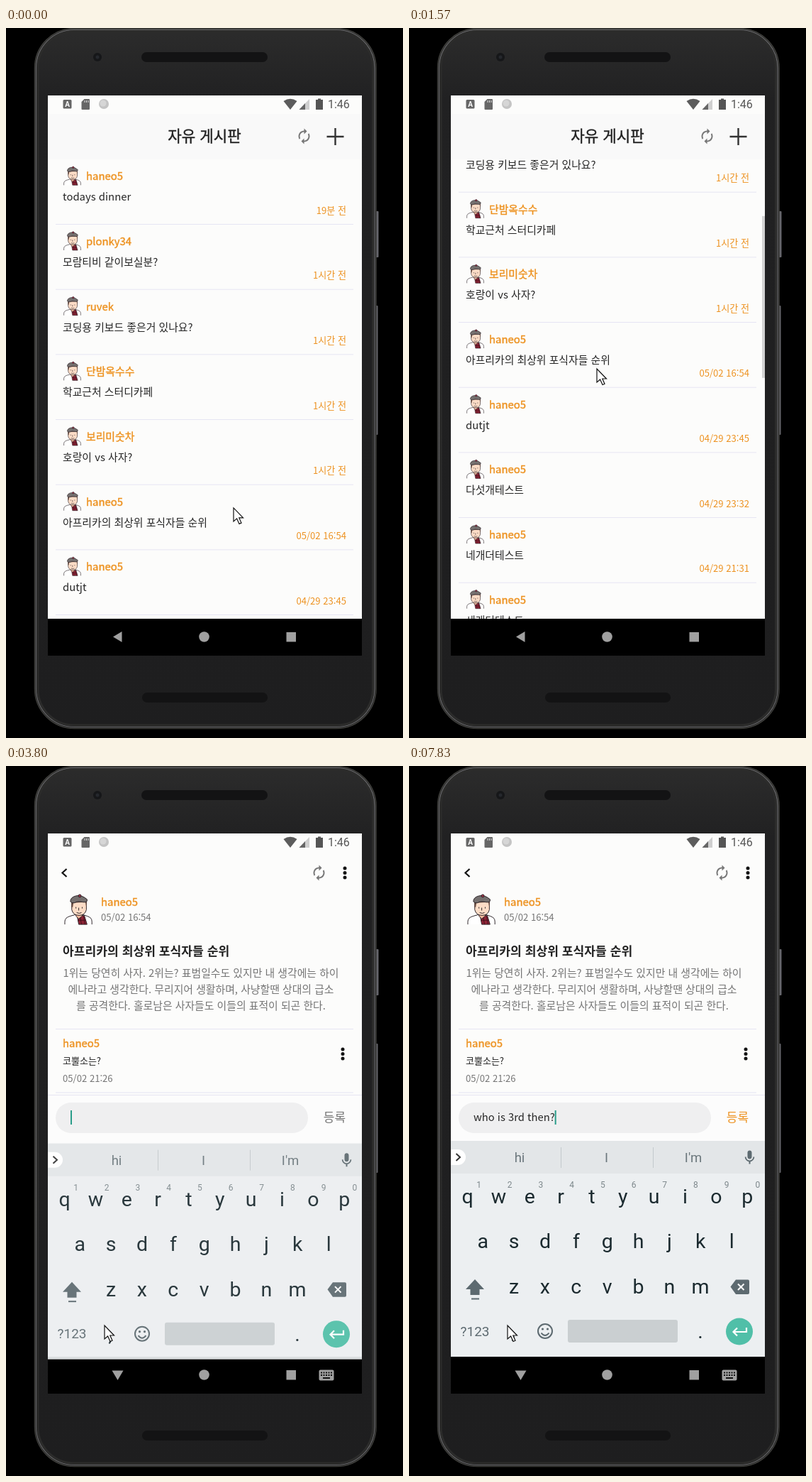
An HTML page for the animation above (8000 ms loop, 560 by 1000 pixels).

```html
<!DOCTYPE html>
<html lang="ko">
<head>
<meta charset="utf-8">
<title>Board</title>
<style>
html, body { margin: 0; width: 100%; height: 100%; overflow: hidden; background: #000; }
svg { display: block; width: 100%; height: 100%; }
text { font-family: "Noto Sans CJK KR", "Noto Sans CJK JP", "Noto Sans CJK", sans-serif; white-space: pre; }
.r { font-family: Roboto, sans-serif; }
.medium { stroke: currentColor; stroke-width: .4; }
</style>
</head>
<body>
<svg id="stage" viewBox="0 0 560 1000"></svg>
<script>
const LOOP = 8000, ORANGE = '#ed9220', LINE = '#e6e5f3', GREY = '#757575';
const OPEN = 2280, IME = 3675, LIFT = 304, PITCH = 91.67;
const BODY = 14.87;
const me = 'haneo5';

const posts = [
  [me, 'todays dinner', '19분 전'],
  ['plonky34', '모람티비 같이보실분?', '1시간 전'],
  ['ruvek', '코딩용 키보드 좋은거 있나요?', '1시간 전'],
  ['단밤옥수수', '학교근처 스터디카페', '1시간 전'],
  ['보리미숫차', '호랑이 vs 사자?', '1시간 전'],
  [me, '아프리카의 최상위 포식자들 순위', '05/02 16:54'],
  [me, 'dutjt', '04/29 23:45'],
  [me, '다섯개테스트', '04/29 23:32'],
  [me, '네개더테스트', '04/29 21:31'],
  [me, '세개더테스트', '04/29 21:30']
];
const comments = [
  [me, '코뿔소는?', '05/02 21:26'],
  ['ruvek', '그럼 코끼리는 어디쯤 있나요...', '05/02 21:40'],
  [me, '하이에나는 무리로 다닐때 정말 위협적인 동물이죠.', '05/02 21:52']
];
const idle = ['hi', 'I', "I'm"];
// time, typed text, suggestions
const typing = [
  [0, '', idle],
  [4550, 'w', ['what', 'w', 'we']],
  [4720, 'wh', ['what', 'wh', 'why']],
  [4900, 'who', ['whole', 'who', 'whose']],
  [5100, 'who ', ['is', 'are', 'the']],
  [5400, 'who i', ['i', 'I', 'is']],
  [6030, 'who is', ['its', 'is', "isn't"]],
  [6110, 'who is ', ['the', 'this', 'that']],
  [6270, 'who is 3', ['the', 'this', 'that']],
  [6330, 'who is 3r', ['the', 'this', 'that']],
  [6480, 'who is 3rd', ['3rs', '3rd', '3d']],
  [6650, 'who is 3rd ', ['and', 'in', 'on']],
  [6870, 'who is 3rd t', ['to', 't', 'the']],
  [6960, 'who is 3rd th', ['the', 'th', 'that']],
  [7080, 'who is 3rd the', ['they', 'the', 'then']],
  [7190, 'who is 3rd then', ['them', 'then', 'thence']],
  [7650, 'who is 3rd then?', idle]
];
const pointer = [
  [0, 321, 676], [550, 318, 627], [1070, 306, 519], [1570, 265, 480],
  [2150, 254, 466], [2850, 254, 466], [3450, 139, 788], [LOOP, 139, 788]
];

// y is the visual middle of the line
function text(x, y, size, str, fill, o = {}) {
  const medium = o.w === 500 ? `class="medium" color="${fill}"` : '';
  return `<text x="${x}" y="${y + size * 0.36}" font-size="${size}" fill="${fill}" ${medium}
    font-weight="${o.w === 700 ? 700 : 400}" text-anchor="${o.a || 'start'}" ${o.x || ''}>${str}</text>`;
}
const rect = (x, y, w, h, fill, rx = 0, more = '') =>
  `<rect x="${x}" y="${y}" width="${w}" height="${h}" rx="${rx}" fill="${fill}" ${more}/>`;
const path = (d, fill, more = '') => `<path d="${d}" fill="${fill}" ${more}/>`;
const circle = (x, y, r, fill, more = '') => `<circle cx="${x}" cy="${y}" r="${r}" fill="${fill}" ${more}/>`;
const rule = (y, x = 70, w = 420) => rect(x, y, w, 1, LINE);
const stroke = (c, w) => `stroke="${c}" stroke-width="${w}"`;
const dots = (x, y) => [-6.5, 0, 6.5].map(d => circle(x, y + d, 2.5, '#151515')).join('');
const refresh = (x, y) => path('M12 6v3l4-4-4-4v3c-4.4 0-8 3.6-8 8 0 1.6.5 3 1.2 4.3L6.7 14.8c-.5-.8-.7-1.8-.7-2.8 0-3.3 2.7-6 6-6z' +
  'm6.8 1.7L17.3 9.2c.4.8.7 1.8.7 2.8 0 3.3-2.7 6-6 6v-3l-4 4 4 4v-3c4.4 0 8-3.6 8-8 0-1.6-.5-3-1.2-4.3z',
  '#777', `transform="translate(${x - 12} ${y - 12})"`);
const avatar = (x, y, s) => `<use href="#face" transform="translate(${x} ${y}) scale(${s})"/>`;

const defs = `<defs>
  <clipPath id="screen">${rect(59, 95, 443, 789, '#000')}</clipPath>
  <clipPath id="page">${rect(59, 95, 443, 737, '#000')}</clipPath>
  <clipPath id="rows">${rect(59, 185, 443, 647, '#000')}</clipPath>
  <linearGradient id="shell" x2="0" y2="1">
    <stop stop-color="#2c2c2c"/><stop offset=".1" stop-color="#212122"/><stop offset="1" stop-color="#1e1e1f"/>
  </linearGradient>
  <g id="face" stroke="#2a2226" stroke-width="1" stroke-linejoin="round">
    <path d="M1 44v-4q0-6 8-8l7-2h11l6 2q7 2 7 8v4" fill="#fff"/>
    <path d="M19 33l10-2 4 13H21z" fill="#8e2335"/>
    <path d="M23 33l2 11M28 32l2 12M20 38h11" stroke="#43121d"/>
    <path d="M17 28h9v4l-5 4-4-4z" fill="#f3b99c"/>
    <path d="M11 11h21v12q-2 8-10.500 8T11 23z" fill="#fcdcc6"/>
    <path d="M10.500 12v8l2-1 1-6 17-1 1 5 1 1V10z" fill="#6b4f45" stroke="none"/>
    <path d="M9 11Q9 5 17 3t16 5q1 5-6 4-8-2-12 1-5 1-6-2z" fill="#75706f"/>
    <circle cx="22.500" cy="3" r="2" fill="#a33247"/>
    <path d="M17 19v2M26 19v2M21 20v4M18 27q4 2 7 0" fill="none"/>
  </g>
</defs>`;

const phone = `
  ${rect(520, 258, 5.5, 65, '#66666c', 1)}${rect(520, 391, 4.5, 182, '#66666c', 1)}
  ${rect(40.5, 0.5, 481.5, 986, 'url(#shell)', 56, stroke('#3d3d3a', 1.5))}
  ${rect(42.5, 2.5, 477.5, 982, 'none', 54, stroke('#68686a', 1.2))}
  ${rect(45, 5, 472.5, 977, 'none', 51, stroke('#2c2c2b', 3))}
  ${circle(129, 41, 6, '#161719')}${circle(129, 41, 2.5, '#25282d')}
  ${rect(191, 34, 178, 14, '#131314', 7)}${rect(192, 936, 177, 14, '#131314', 7)}
  ${rect(59, 95, 443, 789, '#000')}`;

const nav = `
  ${path('M151 857.500L163.500 850V865Z', '#a0a0a0', 'id="back"')}
  ${path('M149.500 851.500H165.500L157.500 865Z', '#a0a0a0', 'id="hide"')}
  ${circle(279.5, 857.5, 7.3, '#a0a0a0')}${rect(395.5, 851, 13.5, 13.5, '#a0a0a0')}
  <g id="imeIcon">${rect(441.5, 850.5, 21, 15, '#a0a0a0', 2)}
    ${path('M444 854.500H460M444 858H460', 'none', 'stroke="#111" stroke-width="2" stroke-dasharray="2 1.500"')}
    ${path('M447 862H457', 'none', stroke('#111', 2))}</g>`;

const status = `
  ${rect(80.5, 101, 12, 12.5, '#666', 1.5)}
  ${text(86.5, 107.3, 10, 'A', '#fff', { a: 'middle', w: 700, x: 'class="r"' })}
  ${path('M110.500 100H117q1 0 1 1V114q0 1-1 1H107.500q-1 0-1-1V104Z', '#666')}
  ${path('M111 102V105M113.500 102V105M116 102V105', 'none', stroke('#ddd', 1))}
  ${circle(138, 107, 7, '#c4c4c4')}${circle(137, 106, 4.5, '#d6d6d6')}
  ${path('M391.500 103Q401 96.500 410.500 103L401 115Z', '#5c5c5c')}
  ${path('M428 100V115H413.500Z', '#cfcfcf')}${path('M422 106V115H413.500Z', '#666')}
  ${path('M440 99.500H444V101H447V115H437V101H440Z', '#555')}
  ${text(454, 107.5, 16, '1:46', '#555', { x: 'class="r"' })}`;

const rows = posts.map(([name, body, date], i) => {
  const y = 209 + i * PITCH;
  return avatar(81, y - 14.5, 0.61) +
    text(113, y, BODY, name, ORANGE, { w: 500 }) +
    text(80, y + 29, BODY, body, '#262626') +
    text(480, y + 48, 13.1, date, ORANGE, { a: 'end' }) + rule(y + 67);
}).join('');

const board = `
  ${rect(59, 95, 443, 737, '#fcfcfb')}
  <g clip-path="url(#rows)"><g id="list">${rows}</g></g>
  ${rect(498, 185.5, 4, 228, '#d3d3d3', 0, 'id="thumb"')}
  ${rect(59, 121, 443, 64, '#f9f9f9')}
  ${text(280, 152, 21.2, '자유 게시판', '#222', { a: 'middle', w: 500 })}
  ${refresh(420.5, 152.5)}
  ${path('M452.500 153H476.500M464.500 141V165', 'none', stroke('#333', 2.4))}`;

const replies = comments.map(([name, body, date], i) => {
  const y = 391 + i * 89.4;
  return text(80, y, BODY, name, ORANGE, { w: 500 }) +
    text(80, y + 24.5, 13, body, '#222') +
    text(80, y + 49, 13.1, date, GREY) + dots(475, y + 14.5) + rule(y + 68.5);
}).join('');

const detail = `<g clip-path="url(#page)">
  ${rect(59, 95, 443, 737, '#fcfcfb')}
  ${path('M85.500 145L79.500 150.500L85.500 156', 'none', stroke('#111', 2.2))}
  ${refresh(441.5, 150.5)}${dots(478, 150.5)}
  ${avatar(82, 180, 0.98)}
  ${text(134, 192, BODY, me, ORANGE, { w: 500 })}
  ${text(134, 213.5, 13.1, '05/02 16:54', GREY)}
  ${text(80, 261, 17.15, '아프리카의 최상위 포식자들 순위', '#222', { w: 700 })}
  ${['1위는 당연히 사자. 2위는? 표범일수도 있지만 내 생각에는 하이',
     '에나라고 생각한다. 무리지어 생활하며, 사냥할땐 상대의 급소',
     '를 공격한다. 홀로남은 사자들도 이들의 표적이 되곤 한다.']
    .map((s, i) => text(275, 292 + i * 22.6, BODY, s, GREY, { a: 'middle' })).join('')}
  ${rule(370)}
  <g id="replies">${replies}</g>
  <g id="bar">
    ${rect(59, 767, 443, 65 + LIFT, '#fcfcfc')}${rule(767, 59, 443)}
    ${rect(70, 778, 356, 43, '#efeff0', 21.5)}
    ${text(91, 799, 14.75, '', '#262626', { x: 'id="field"' })}
    ${rect(91, 789, 2, 20, '#2a9d8a', 0, 'id="caret"')}
    ${text(463.5, 798.5, 17, '등록', GREY, { a: 'middle', x: 'id="send"' })}
  </g></g>`;

const key = (x, y, c) => `<text class="r" x="${x}" y="${y + 10}" font-size="28.500" fill="#1b2a2f" text-anchor="middle">${c}</text>`;
const keyRow = (letters, x, y) => [...letters].map((c, i) => key(x + i * 43.85, y, c)).join('');
const INK = '#5d6a70';

const keyboard = `
  ${rect(59, 528, 443, 304, '#eceff1')}${rect(59, 528, 443, 46, '#e3e6e8')}
  ${path('M59 540H69A11 11 0 0 1 69 562H59Z', '#fff')}
  ${path('M66.500 546L72 551L66.500 556', 'none', stroke('#333', 2))}
  ${[156, 278.5, 401].map((x, i) => text(x, 551.5, 18.5, '', '#6b777c', { a: 'middle', x: `class="r" id="word${i}"` })).join('')}
  ${rect(214, 537, 1, 29, '#c3c9cc')}${rect(344, 537, 1, 29, '#c3c9cc')}
  ${path('M12 14c1.700 0 3-1.300 3-3V5c0-1.700-1.300-3-3-3S9 3.300 9 5v6c0 1.700 1.300 3 3 3zm5-3c0 2.800-2.200 5-5 5s-5-2.200-5-5H5.300c0 3.400 2.700 6.200 5.700 6.700V21h2v-3.300c3-.5 5.700-3.300 5.700-6.700z',
    INK, 'transform="translate(468.500 539.500)"')}
  ${keyRow('qwertyuiop', 82.5, 606)}${keyRow('asdfghjkl', 104.3, 669)}${keyRow('zxcvbnm', 148, 733)}
  ${[...'1234567890'].map((c, i) => text(98.5 + i * 43.7, 590, 12, c, '#7d878b', { a: 'middle', x: 'class="r"' })).join('')}
  ${path('M93 723L106 737H99.500V745H86.500V737H80Z', INK)}${rect(88, 749.5, 11, 2, INK)}
  ${path('M453.500 733.500L461 723.500H478Q480 723.500 480 725.500V742Q480 744 478 744H461Z', INK)}
  ${path('M464 729.500L472.500 738M472.500 729.500L464 738', 'none', stroke('#fff', 2))}
  ${text(93, 796, 19, '?123', INK, { a: 'middle', x: 'class="r"' })}
  ${key(147, 796, ',')}${key(411, 796, '.')}
  ${circle(192, 796, 10, 'none', stroke(INK, 2))}
  ${circle(188.5, 793, 1.6, INK)}${circle(195.5, 793, 1.6, INK)}
  ${path('M186.500 798.500Q192 805.500 197.500 798.500', 'none', stroke(INK, 2))}
  ${rect(224, 780, 155, 32, '#cacfd1', 3)}
  ${circle(466, 796.5, 19, '#50bfa8')}
  ${path('M476 791V797H458M463 791.500L457.500 797L463 802.500', 'none', stroke('#fff', 2.2))}`;

document.getElementById('stage').innerHTML = `${defs}${phone}
  <g clip-path="url(#screen)">
    ${nav}
    <g id="board">${board}</g>
    ${rect(59, 95, 443, 737, '#000', 0, 'id="dim"')}
    <g id="detail">${detail}</g>
    <g id="keyboard">${keyboard}</g>
    ${status}
  </g>
  ${path('M0 0V19L4.600 15L8 22.500L11 21.200L7.800 14H13.500Z', '#fff', 'id="cursor" stroke="#111" stroke-width="1.200"')}`;

const ui = {};
document.querySelectorAll('#stage [id]').forEach(n => ui[n.id] = n);
const words = [ui.word0, ui.word1, ui.word2];
const clamp = v => Math.max(0, Math.min(1, v));
const span = (t, from, len) => clamp((t - from) / len);
const move = (n, x, y) => n.setAttribute('transform', `translate(${x} ${y})`);
const show = (n, on) => n.setAttribute('visibility', on ? 'visible' : 'hidden');
const fade = (n, v) => n.setAttribute('opacity', v);

// finger drag, then a fling that slows to rest
function scrollAt(t) {
  return 108 * span(t, 570, 500) ** 2 + 122 * (1 - (1 - span(t, 1070, 560)) ** 2);
}

function pointerAt(t) {
  const i = pointer.findIndex(p => p[0] > t);
  const [t0, x0, y0] = pointer[i - 1], [t1, x1, y1] = pointer[i];
  let u = (t - t0) / (t1 - t0);
  if (t > 1070) u = u * u * (3 - 2 * u);
  return [x0 + (x1 - x0) * u, y0 + (y1 - y0) * u];
}

let shown = null;
function type(step) {
  if (step === shown) return;
  shown = step;
  const [, str, list] = step;
  ui.field.textContent = str;
  ui.caret.setAttribute('x', 91 + (str ? ui.field.getComputedTextLength() : 0));
  ui.send.setAttribute('fill', str ? ORANGE : GREY);
  words.forEach((n, i) => n.textContent = list[i]);
  words[1].setAttribute('font-weight', list === idle ? 400 : 500);
}

function draw(t) {
  const off = scrollAt(t);
  move(ui.list, 0, -off);
  move(ui.thumb, 0, off * 0.347);
  fade(ui.thumb, span(t, 570, 120) * (1 - span(t, 1930, 250)));

  const open = span(t, OPEN, 350);
  show(ui.detail, t >= OPEN);
  move(ui.detail, 0, 60 * (1 - open) ** 3);
  fade(ui.detail, span(t, OPEN, 160));
  fade(ui.dim, 0.17 * span(t, OPEN, 150));
  fade(ui.replies, span(t, 2460, 150));

  const ime = t >= IME, rise = span(t, IME, 250);
  show(ui.keyboard, ime);
  show(ui.hide, ime);
  show(ui.imeIcon, ime);
  show(ui.back, !ime);
  move(ui.keyboard, 0, 30 * (1 - rise) ** 3);
  fade(ui.keyboard, 0.5 + 0.5 * clamp(rise * 1.7));
  move(ui.bar, 0, ime ? -LIFT : 0);

  type(typing.filter(s => s[0] <= t).pop());
  const blinkOn = t >= 4550 || (t - IME) % 1000 < 500;
  fade(ui.caret, ime && blinkOn ? 1 : 0);
  move(ui.cursor, ...pointerAt(t));
}

const start = performance.now();
function tick() {
  draw((performance.now() - start) % LOOP);
  requestAnimationFrame(tick);
}
tick();
</script>
</body>
</html>
```
